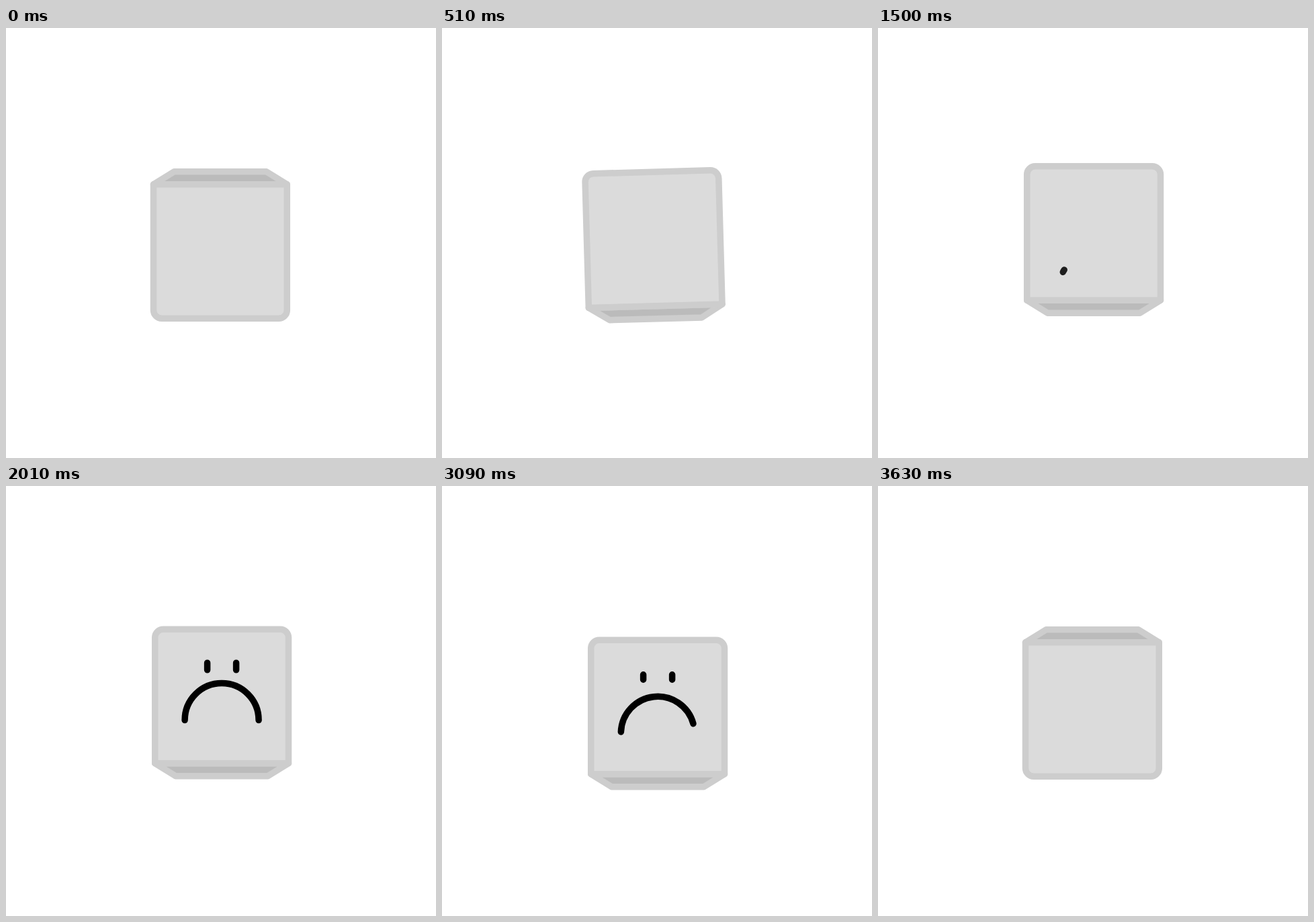
Recreate the animation shown at these times as an HTML page. Size 640 by 640 pixels, loop 4.53 s.

```html
<!DOCTYPE html>
<html lang="en">
<head>
<meta charset="utf-8">
<title>Sad box</title>
<style>
  html, body { margin: 0; width: 100%; height: 100%; overflow: hidden; background: #fff; }
  svg { display: block; width: 100vw; height: 100vh; }
</style>
</head>
<body>
<svg viewBox="0 0 640 640">
  <rect width="640" height="640" fill="#fff"/>
  <g id="box">
    <g stroke="#cdcdcd" stroke-width="9.5" stroke-linejoin="round">
      <path fill="#bbb" d="M-99.4 90.2L-68.6 109.3H68.6L99.4 90.2Z"/>
      <path fill="#dbdbdb" d="M-99.4 90.2V-97A12.3 12.3 0 0 1 -87.1 -109.3H87.1A12.3 12.3 0 0 1 99.4 -97V90.2Z"/>
    </g>
    <g id="face" fill="none" stroke="#000" stroke-width="9.5" stroke-linecap="round">
      <path id="mouth"/>
      <path id="eyes"/>
    </g>
  </g>
</svg>
<script>
const LOOP = 4530, STEP = 30;
const FLIP_END = 540, BACK = 3212, REST = 3630;
const el = id => document.getElementById(id);
const box = el('box'), face = el('face'), mouth = el('mouth'), eyes = el('eyes');

const ramp = (t, a, b) => Math.min(1, Math.max(0, (t - a) / (b - a)));
const ease = (t, a, b) => { const u = ramp(t, a, b); return u * u * (3 - 2 * u); };
const mix = (a, b, p) => a + (b - a) * p;

// Bump from 0 to 1 and back; its peak is at u = p / (p + q)
const curve = (u, p, q) => u ** p * (1 - u) ** q;
const hop = (u, p, q) => curve(u, p, q) / curve(p / (p + q), p, q);

// Slow rise and fall while the box stands with its lid down
const bob = t => -6 * ease(t, FLIP_END, 720) + 17.5 * ease(t, 720, 1180)
  - 23.5 * ease(t, 1180, 1500) + 23.5 * ease(t, 1500, 2850)
  - 11.5 * ease(t, BACK, REST);

function drawMouth(p) {
  const r = mix(52.3, 55, p), half = mix(Math.PI / 3, Math.PI / 2, p), cy = mix(75.3, 26, p);
  const at = a => (r * Math.sin(a)).toFixed(2) + ' ' + (cy - r * Math.cos(a)).toFixed(2);
  const end = -half + Math.max(0.01, 2 * half * p);
  mouth.setAttribute('d', `M${at(-half)}A${r} ${r} 0 0 1 ${at(end)}`);
}

function drawEyes(p) {
  const h = 5.3 * p;
  eyes.setAttribute('d', [-21.5, 21.5].map(x => `M${x} ${-54 - h}V${-53.99 + h}`).join(''));
  eyes.setAttribute('opacity', Math.min(1, p * 5));
}

function render(t) {
  const go = ramp(t, 0, FLIP_END), back = ramp(t, BACK, REST);
  const turn = 180 * (ease(t, 0, FLIP_END) - ease(t, BACK, REST));
  const x = 320 - 53.5 * hop(go, 4, 2) - 19.5 * hop(back, 3, 3);
  const y = 325 + bob(t) - 30.5 * hop(go, 4, 2) + 8 * hop(go, 2, 6) + 20.2 * hop(back, 6, 3);
  box.setAttribute('transform', `translate(${x} ${y}) rotate(${turn - 180}) translate(1.1 2)`);
  face.setAttribute('opacity', ramp(t, 1440, 1510) * (1 - ramp(t, 3330, 3480)));
  drawMouth(ease(t, 1440, 1980) - ease(t, 3030, 3390));
  drawEyes(ease(t, 1650, 1950) - ease(t, 3000, 3250));
}

const start = performance.now();
function tick() {
  const t = Math.max(0, performance.now() - start) % LOOP;
  render(Math.floor(t / STEP) * STEP);
  requestAnimationFrame(tick);
}
tick();
</script>
</body>
</html>
```
